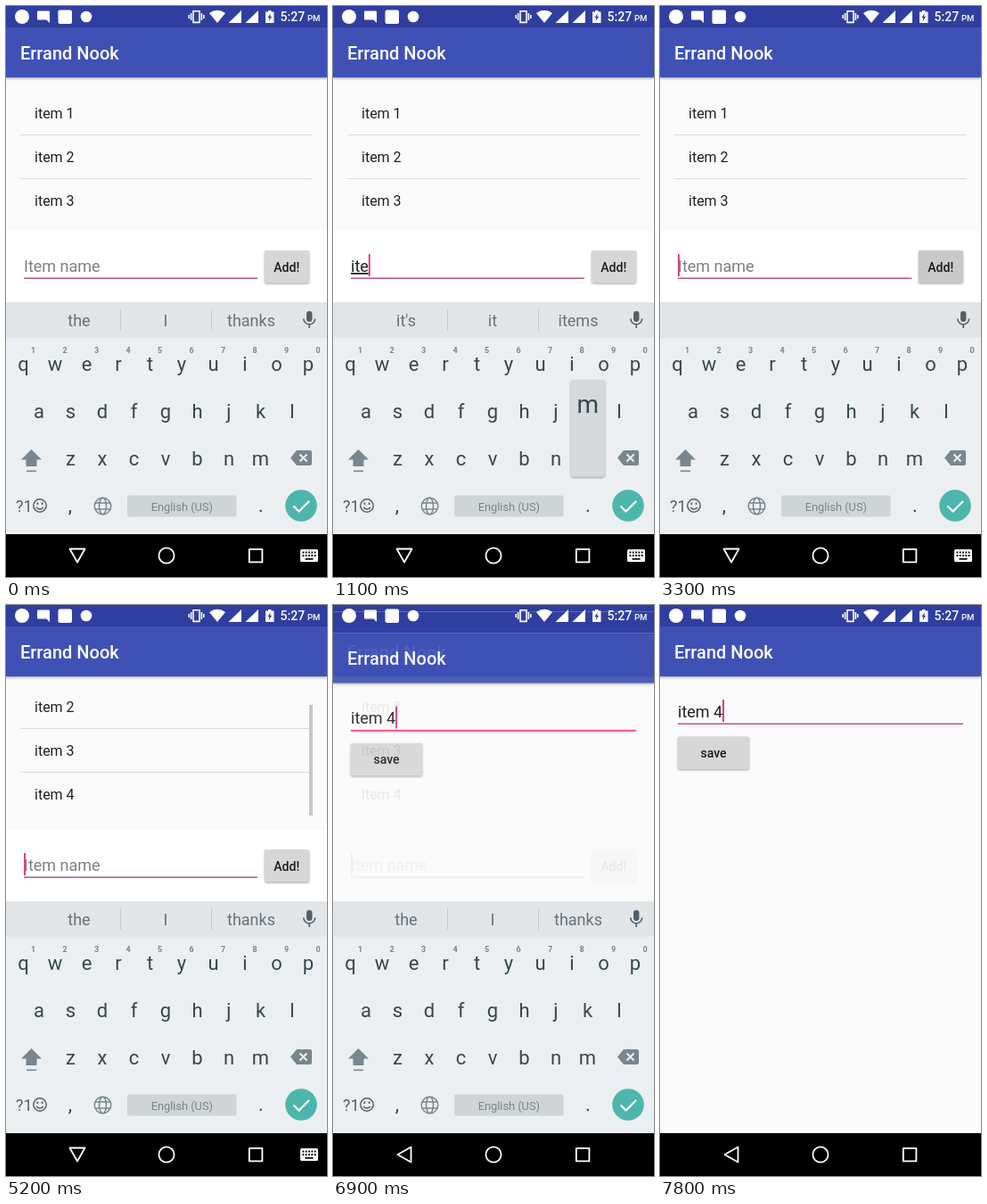
Recreate the animation shown at these times as an HTML page. Size 360x640 px, loop 8000 ms.

```html
<!DOCTYPE html>
<html lang="en">
<head>
<meta charset="utf-8">
<title>Errand Nook</title>
<style>
html, body { margin: 0; width: 100%; height: 100%; overflow: hidden; background: #000; }
svg { display: block; width: 360px; height: 640px; font-family: Roboto, "Noto Sans", sans-serif; }
text { white-space: pre; }
.mid { text-anchor: middle; }
.title { font-size: 20px; font-weight: 500; fill: #fff; }
.item { font-size: 16px; fill: #212121; }
.field { font-size: 18px; fill: #212121; }
.hint { fill: #808080; }
.btn { font-size: 14px; font-weight: 500; fill: #1c1c1c; text-anchor: middle; }
.word { font-size: 18px; fill: #66727a; text-anchor: middle; }
.key { font-size: 22px; fill: #37474f; text-anchor: middle; }
.num { font-size: 9px; font-weight: 700; fill: #78868d; text-anchor: middle; }
.big { font-size: 28px; fill: #37474f; text-anchor: middle; }
.composing { text-decoration: underline; text-decoration-thickness: 1px; }
.raised { filter: drop-shadow(0 1px 1.2px rgba(0,0,0,.35)); }
.bar { filter: drop-shadow(0 1px 1.5px rgba(0,0,0,.4)); }
</style>
</head>
<body>
<svg viewBox="0 0 360 640">
  <defs>
    <clipPath id="listClip"><rect x="16" y="96" width="328" height="140"/></clipPath>
    <clipPath id="rowClip"><rect x="16" y="188" width="328" height="48"/></clipPath>
    <clipPath id="btnClip"><rect x="290" y="274" width="50" height="36.5" rx="2"/></clipPath>
    <clipPath id="imeClip"><rect width="360" height="592"/></clipPath>
  </defs>

  <!-- list screen -->
  <rect width="360" height="592" fill="#fafafa"/>
  <rect width="360" height="24" fill="#303f9f"/>
  <rect class="bar" y="24" width="360" height="56" fill="#3f51b5"/>
  <text class="title" x="16" y="60">Errand Nook</text>
  <g clip-path="url(#listClip)">
    <g id="rows"></g>
    <rect id="thumb" x="340" y="96" width="4" height="124" fill="#c8c8c8"/>
  </g>
  <g clip-path="url(#rowClip)"><circle id="rowRipple" cx="150" cy="212" fill="#000"/></g>
  <rect y="252" width="360" height="80" fill="#fff"/>
  <text class="field hint" id="hint" x="20" y="298">Item name</text>
  <text class="field" id="entry" x="20" y="298"></text>
  <rect x="20" y="304.4" width="262" height="1.6" fill="#bd5f90"/>
  <rect id="caret" y="278" width="2" height="25" fill="#e0437f"/>
  <rect class="raised" x="290" y="274" width="50" height="36.5" rx="2" fill="#d6d6d6"/>
  <g clip-path="url(#btnClip)"><circle id="btnRipple" cx="308" cy="292" fill="#000"/></g>
  <text class="btn" x="314.7" y="297.5">Add!</text>

  <!-- edit screen -->
  <g id="edit">
    <rect width="360" height="592" fill="#fafafa"/>
    <rect width="360" height="24" fill="#303f9f"/>
    <rect class="bar" y="24" width="360" height="56" fill="#3f51b5"/>
    <text class="title" x="16" y="60">Errand Nook</text>
    <text class="field" x="20" y="125.5">item 4</text>
    <rect id="editLine" x="20" y="132.4" width="320"/>
    <rect id="editCaret" x="70" y="106" width="2" height="25" fill="#e0437f"/>
    <rect class="raised" x="20" y="147.5" width="80" height="36.5" rx="2" fill="#d6d6d6"/>
    <text class="btn" x="60" y="171">save</text>
  </g>

  <!-- keyboard -->
  <g clip-path="url(#imeClip)">
    <g id="ime">
      <rect y="332" width="360" height="260" fill="#eceff1"/>
      <rect y="332" width="360" height="39.5" fill="#e2e5e8"/>
      <g id="words">
        <path d="M128.5 340v24M230.5 340v24" stroke="#c3c9cd"/>
        <text class="word" x="82" y="359"></text>
        <text class="word" x="179" y="359"></text>
        <text class="word" x="275" y="359"></text>
      </g>
      <rect x="337" y="342" width="6.4" height="12" rx="3.2" fill="#546067"/>
      <path d="M333.8 350.5a6.4 6.4 0 0 0 12.8 0M340.2 357v4" fill="none" stroke="#546067" stroke-width="1.7"/>
      <g id="keys"></g>
      <path d="M28.5 497L40 508.5H34.5V516H22.5V508.5H17Z" fill="#78868d"/>
      <rect x="23" y="520.5" width="11" height="1.6" fill="#78868d"/>
      <path d="M319 506.5L326 498H341Q343 498 343 500V513Q343 515 341 515H326Z" fill="#78868d"/>
      <path d="M329.5 502.5l8 8M337.5 502.5l-8 8" stroke="#eceff1" stroke-width="2"/>
      <text x="11" y="566.5" font-size="18" fill="#546067">?1</text>
      <g fill="none" stroke="#546067" stroke-width="1.5">
        <circle cx="38" cy="560" r="7.2"/>
        <path d="M34 562q4 4 8 0"/>
        <path d="M35.4 556.5v2.6M40.6 556.5v2.6" stroke-width="1.8"/>
      </g>
      <g fill="none" stroke="#78868d" stroke-width="1.5">
        <circle cx="108.5" cy="560.5" r="9.3"/>
        <ellipse cx="108.5" cy="560.5" rx="4" ry="9.3"/>
        <path d="M100 557h17M100 564h17"/>
      </g>
      <rect id="space" x="136" y="548.5" width="122.5" height="24" rx="2"/>
      <text class="mid" x="197.3" y="565.5" font-size="12.8" fill="#78868d">English (US)</text>
      <text class="key" x="72" y="567">,</text>
      <text class="key" x="286" y="567">.</text>
      <circle cx="331" cy="560" r="17.8" fill="#4db6ac"/>
      <path d="M322.5 560.5l6 6L340 555" fill="none" stroke="#fff" stroke-width="2.2"/>
      <g id="popup">
        <rect class="raised" x="-19" width="38" height="108.5" rx="3" fill="#d5d9dc"/>
        <text class="big" y="37"></text>
        <path id="dots" d="M6 46.5h9.5" stroke="#78868d" stroke-width="1.4" stroke-dasharray="1.5 2.2"/>
      </g>
      <g id="panel">
        <rect class="raised" x="106.5" y="308" width="39" height="50" rx="3" fill="#d5d9dc"/>
        <text class="big" x="126" y="343">4</text>
      </g>
    </g>
  </g>

  <!-- status bar -->
  <g fill="#fff">
    <circle cx="18" cy="12" r="8"/>
    <path d="M36 5.5H48Q49 5.5 49 6.5V19L45.5 15.5H36Q35 15.5 35 14.5V6.5Q35 5.5 36 5.5Z"/>
    <rect x="58.5" y="4.5" width="15.5" height="15.5" rx="2"/>
    <circle cx="90" cy="12" r="6.3"/>
    <path d="M237 19L228 8Q237 1.5 246 8Z"/>
    <path d="M264 5V19H249.5ZM283 5V19H268.5Z"/>
    <path d="M294 5h3.5v1.5H300.5V19H291V6.5H294Z"/>
    <path d="M296.8 8l-3.4 5.3h2l-.8 4 3.6-5.5h-2.1z" fill="#303f9f"/>
    <text x="307.5" y="17.3" font-size="14" font-weight="500">5:27</text>
    <text x="338" y="17.3" font-size="9.5" font-weight="500">PM</text>
  </g>
  <path d="M210 5.8h7v12.6h-7zM207.6 8v8M219.4 8v8M205.2 10v4M221.8 10v4" fill="none" stroke="#fff" stroke-width="1.6"/>

  <!-- navigation bar -->
  <rect y="592" width="360" height="48" fill="#000"/>
  <g fill="none" stroke="#fff" stroke-width="1.8" stroke-linejoin="round">
    <path id="back" d="M71.5 608.5H88.5L80 623.5Z"/>
    <circle cx="180" cy="616" r="8.6"/>
    <rect x="272.8" y="608.8" width="14.6" height="14.6"/>
  </g>
  <g id="switcher">
    <rect x="330" y="609" width="20" height="14" rx="1.5" fill="#fff"/>
    <path d="M332.5 612.5h15.5M332.5 616h15.5" stroke="#000" stroke-width="1.8" stroke-dasharray="1.8 1.5"/>
    <path d="M335.5 619.8h9" stroke="#000" stroke-width="1.7"/>
  </g>
</svg>
<script>
const LOOP = 8000, STEP = 100;
const $ = id => document.getElementById(id);
const set = (el, attrs) => { for (const k in attrs) el.setAttribute(k, attrs[k]); };
const show = (el, on) => { el.style.display = on ? '' : 'none'; };
const ramp = (t, from, to) => Math.min(1, Math.max(0, (t - from) / (to - from)));
const add = (parent, tag, attrs, text = '') => {
  const el = document.createElementNS('http://www.w3.org/2000/svg', tag);
  set(el, attrs);
  el.textContent = text;
  return parent.appendChild(el);
};

// letter rows: first key centre and baseline
const layout = [['qwertyuiop', 19.5, 409], ['asdfghjkl', 37, 462], ['zxcvbnm', 72.5, 515]];
const keyAt = {};
layout.forEach(([letters, x0, y], row) => [...letters].forEach((c, i) => {
  const x = x0 + i * 35.5;
  keyAt[c] = { x, y, row };
  add($('keys'), 'text', { class: 'key', x, y }, c);
  if (!row) add($('keys'), 'text', { class: 'num', x: x + 11, y: 388.5 }, (i + 1) % 10);
}));

for (let i = 0; i < 4; i++) {
  const y = 96 + i * 49;
  add($('rows'), 'text', { class: 'item', x: 32, y: y + 30 }, 'item ' + (i + 1));
  if (i < 3) add($('rows'), 'rect', { x: 16, y: y + 48, width: 328, height: 1, fill: '#dadada' });
}
const fourth = $('rows').querySelectorAll('text')[3];
const thirdLine = $('rows').querySelectorAll('rect')[2];

// each entry overrides what came before it
const script = [
  [0, { text: '', mark: false, words: 'the|I|thanks', key: '', space: false, panel: 0 }],
  [300, { key: 'i' }],
  [400, { text: 'i', mark: true }],
  [500, { key: '', words: 'in|I|it' }],
  [600, { key: 't' }],
  [700, { text: 'it' }],
  [800, { key: 'e', words: "it's|it|its" }],
  [900, { text: 'ite' }],
  [1000, { key: '', words: "it's|it|items" }],
  [1100, { key: 'm' }],
  [1200, { text: 'item' }],
  [1300, { key: '', words: "item's|item|items" }],
  [1400, { space: true }],
  [1500, { space: false, text: 'item ', mark: false, words: 'is|name|to' }],
  [2400, { key: 'r' }],
  [2700, { panel: .6 }],
  [2800, { panel: 1 }],
  [3000, { panel: 0, key: '', text: 'item 4' }],
  [3100, { words: '|4|' }],
  [3300, { text: '', words: '' }],
  [3500, { words: 'the|I|thanks' }]
];
const blinks = [300, 2000, 2500, 3800, 4200, 4700, 5200, 5700, 6200];
const stateAt = t => Object.assign({}, ...script.filter(s => s[0] <= t).map(s => s[1]));

function drawTyping(t) {
  const s = stateAt(t);
  const entry = $('entry');
  entry.textContent = s.text;
  entry.classList.toggle('composing', s.mark);
  show($('hint'), !s.text);
  set($('caret'), { x: 20 + (s.text ? entry.getComputedTextLength() : 0) });
  show($('caret'), blinks.filter(b => b <= t).length % 2);

  const words = s.words.split('|');
  show($('words'), s.words);
  $('words').querySelectorAll('text').forEach((el, i) => { el.textContent = words[i] || ''; });

  show($('popup'), s.key);
  if (s.key) {
    const k = keyAt[s.key];
    set($('popup'), { transform: `translate(${k.x + .3} ${k.y - 95.8})` });
    $('popup').querySelector('text').textContent = s.key;
    show($('dots'), k.row === 0);
  }
  set($('panel'), { opacity: s.panel });
  set($('space'), { fill: s.space ? '#b5bdc2' : '#cfd4d7' });

  set($('btnRipple'), {
    r: 12 + 40 * ramp(t, 3100, 3300),
    opacity: t < 3200 ? 0 : .065 * (1 - ramp(t, 3400, 3600))
  });
}

function drawList(t) {
  const scroll = t < 4700 ? 0 : t < 4800 ? 35 : 55;
  set($('rows'), { transform: `translate(0 ${-scroll})` });
  show(fourth, t >= 3300);
  show(thirdLine, t >= 3300);
  set($('thumb'), {
    y: 96 + scroll * 16 / 55,
    opacity: t < 4700 ? 0 : 1 - ramp(t, 5200, 5500)
  });
  set($('rowRipple'), {
    r: 20 + 180 * ramp(t, 5500, 6100),
    opacity: t < 5500 ? 0 : .08 * (1 - ramp(t, 6100, 6800))
  });
}

function drawEdit(t) {
  const start = 6788;
  const rise = 51 * (1 - ramp(t, start, start + 350)) ** 5;
  const alpha = 1 - (1 - ramp(t, start, start + 200)) ** 3;
  set($('edit'), { transform: `translate(0 ${rise})`, opacity: alpha });
  show($('edit'), t >= start);
  const fresh = t < 7000;
  set($('editLine'), { height: fresh ? 2 : 1.6, fill: fresh ? '#ff4081' : '#bd5f90' });
  show($('editCaret'), t < 7400 || t >= 7800);

  const hide = ramp(t, 7000, 7300);
  set($('ime'), { transform: `translate(0 ${26 * hide * hide})`, opacity: 1 - hide });
  show($('switcher'), t < start);
  set($('back'), { transform: t < start ? '' : 'rotate(90 80 616)' });
}

const origin = performance.now();
let last = -1;
function frame() {
  // the picture advances in tenths of a second
  const t = Math.floor((performance.now() - origin) % LOOP / STEP) * STEP;
  if (t !== last) {
    drawTyping(t);
    drawList(t);
    drawEdit(t);
    last = t;
  }
  requestAnimationFrame(frame);
}
frame();
</script>
</body>
</html>
```
